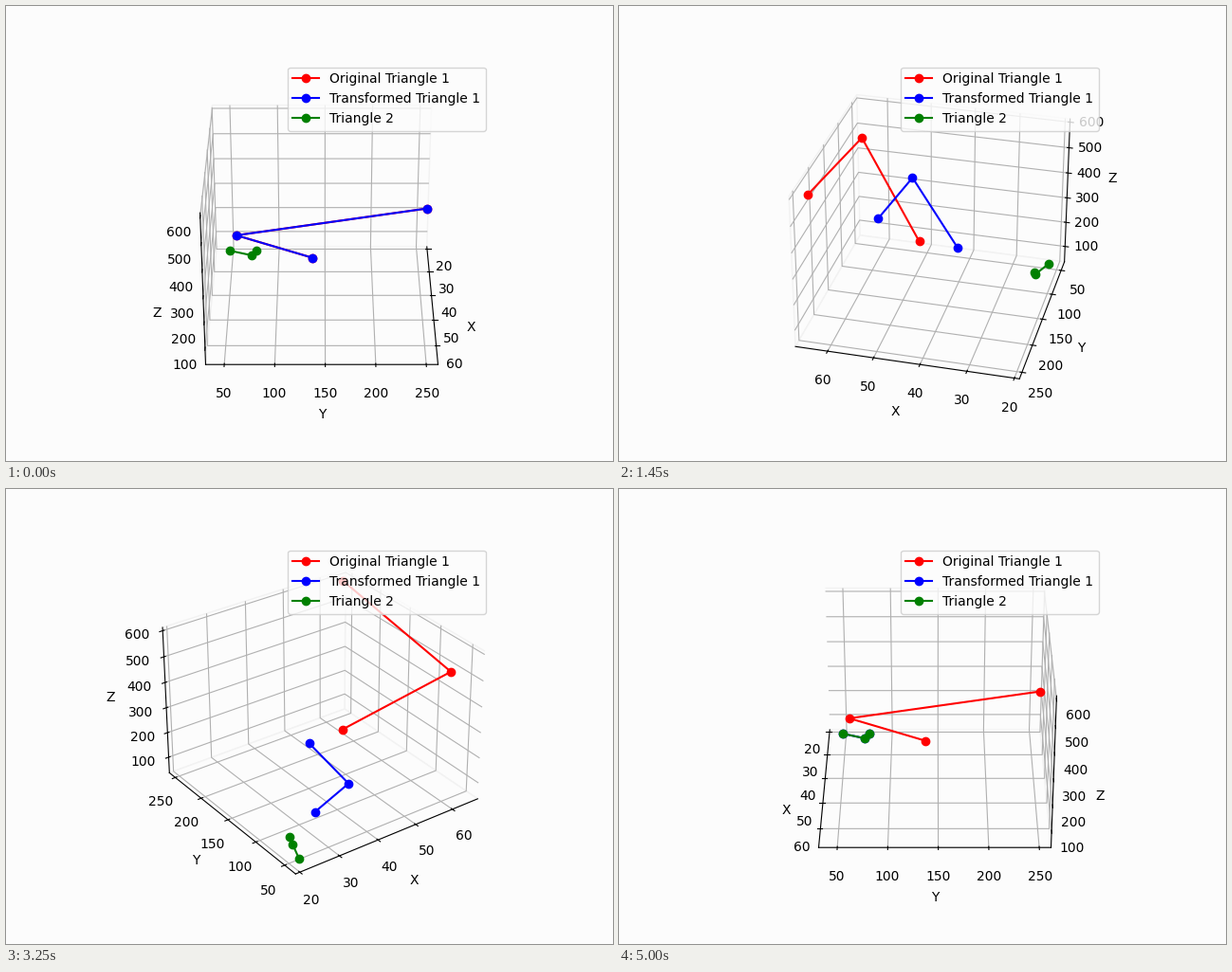
Recreate the animation shown at these times as a matplotlib script. Size 640x480 px, loop 5.05 s.

```python
import numpy as np
import matplotlib.pyplot as plt
from matplotlib.animation import FuncAnimation

STEPS = 100
PAPER = "#fcfcfc"
EDGE = "#f2f2f2"

plt.rcParams.update({
    "figure.facecolor": PAPER,
    "axes.facecolor": PAPER,
    "font.family": "DejaVu Sans",
})

# Rows are corners, columns are x, y, z.
first = np.array([[64, 247, 601], [64, 64.6, 502], [47, 137, 256]], float)
second = np.array([[24, 75.8, 67], [24, 70.6, 47], [22, 46.2, 48]], float)


def padded(values, margin):
    """Data range widened by a margin and by the gap to the pane edge."""
    lo, hi = values.min(), values.max()
    half = (hi - lo) / 2 * (1 + 2 * margin) * 25 / 24
    mid = (lo + hi) / 2
    return mid - half, mid + half


fig = plt.figure(figsize=(6.4, 4.8), dpi=100)
ax = fig.add_subplot(111, projection="3d")


def add_path(points, color, label):
    return ax.plot(*points.T, "o-", color=color, label=label)[0]


add_path(first, "red", "Original Triangle 1")
moving = add_path(first, "blue", "Transformed Triangle 1")
add_path(second, "green", "Triangle 2")

corners = np.vstack([first, second])
ax.set_xticks(np.arange(20, 61, 10))
ax.set_yticks(np.arange(50, 251, 50))
ax.set_zticks(np.arange(100, 601, 100))
ax.set_xlim(*padded(corners[:, 0], 0.05))
ax.set_ylim(*padded(corners[:, 1], 0.05))
ax.set_zlim(*padded(corners[:, 2], 0))
ax.set_xlabel("X")
ax.set_ylabel("Y")
ax.set_zlabel("Z")

for axis in (ax.xaxis, ax.yaxis, ax.zaxis):
    axis.pane.set_alpha(1)
    axis.pane.set_facecolor(PAPER)
    axis.pane.set_edgecolor(EDGE)

ax.legend(loc="best")


def update(i):
    t = i / STEPS
    moving.set_data_3d(*((1 - t) * first + t * second).T)
    # The tiny offset settles which panes show at right angles.
    ax.view_init(elev=30, azim=abs(360 * t - 1e-4))
    return (moving,)


anim = FuncAnimation(fig, update, frames=STEPS + 1, interval=50,
                     repeat=True, repeat_delay=0, blit=False)
plt.show()
```
